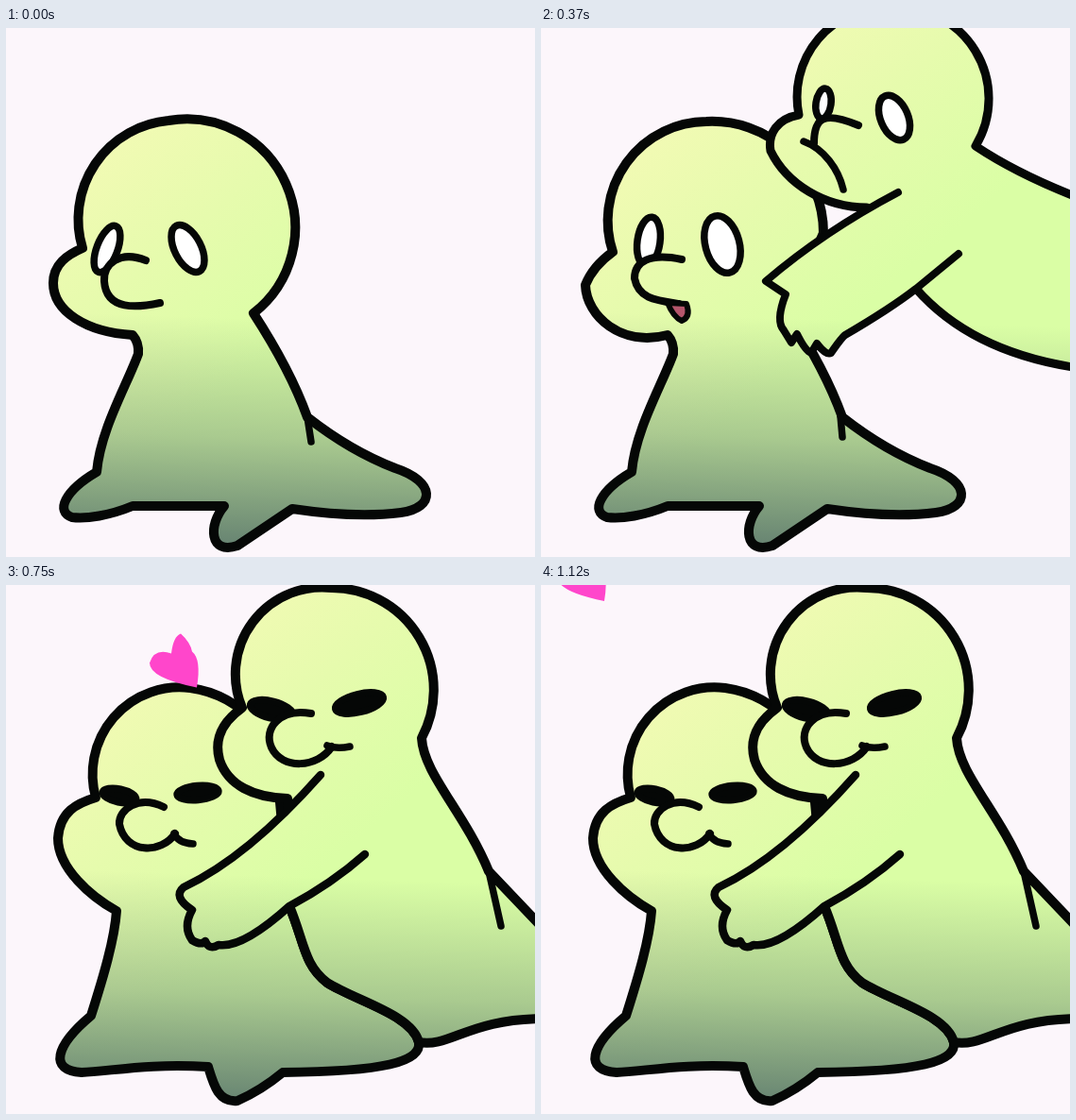
Animation, 560 px wide and 560 px high, one loop 1250 ms. Source, as an HTML page with a canvas:

```html
<!DOCTYPE html>
<html>
<head>
<meta charset="utf-8">
<title>Hug</title>
<style>
html, body { margin: 0; width: 100%; height: 100%; overflow: hidden; background: #fcf6fb; }
canvas { display: block; width: 560px; height: 560px; }
</style>
</head>
<body>
<canvas id="stage" width="560" height="560"></canvas>
<script>
const ctx = document.getElementById('stage').getContext('2d');
ctx.lineCap = ctx.lineJoin = 'round';
const INK = '#050706';

// Colours at even steps between two points
function gradient(x1, y1, x2, y2, ...colors) {
  const g = ctx.createLinearGradient(x1, y1, x2, y2);
  colors.forEach((c, i) => g.addColorStop(i / (colors.length - 1), c));
  return g;
}
const glow = gradient(100, 90, 300, 330, '#f4fab5', '#e6fbad', '#dafea5');
const dusk = gradient(280, 308, 272, 560, 'rgba(90,118,108,0)', 'rgba(90,118,108,.38)', 'rgba(90,118,108,.95)');

// Each maker returns a function that paints one part.
function part(path, width, ...fills) {
  return () => {
    for (const f of fills) { ctx.fillStyle = f; ctx.fill(path); }
    ctx.lineWidth = width;
    ctx.strokeStyle = INK;
    if (width) ctx.stroke(path);
  };
}
const skin = (d, width = 10) => part(new Path2D(d), width, glow, dusk);
const nose = d => skin(d, 8);
const line = d => part(new Path2D(d), 7.5);
function eye(x, y, rx, ry, deg, fill = '#fff') {
  const path = new Path2D();
  path.ellipse(x, y, rx, ry, deg * Math.PI / 180, 0, 7);
  return part(path, 7.5, fill);
}
const shut = (x, y, rx, ry, deg) => eye(x, y, rx, ry, deg, INK);
const arc = (r, sweep, end) => `A${r} ${r} 0 0 ${sweep} ${end}`;

// Head outlines: two arcs meeting at the crown
const buddyHead = (brow, r1, crown, r2, nape) => `M${brow}` + arc(r1, 1, crown) + arc(r2, 1, nape);
const huggerHead = (nape, r1, crown, r2, brow) => `M${nape}` + arc(r1, 0, crown) + arc(r2, 0, brow);

// Lower bodies, from the back round to the throat
const upright = `L262 302 Q301 362 319 412 Q365 448 412 466 C455 480 455 508 418 513 Q370 519 303 509
  L245 548 C215 558 214 526 231 506 H134 C110 516 85 520 70 518 C52 512 62 490 96 470
  C100 425 128 378 140 345 Q141 333 134 325`;
const back = 'L300 340 C316 378 315 402 340 421 C370 440 430 455 437 484';
const leaning = back + `C440 505 400 515 293 516 Q270 535 245 546 C225 548 220 530 214 510
  C150 506 110 515 80 516 C45 514 52 488 90 456 C103 415 115 375 117 345`;

const buddy = (head, base, muzzle) => skin(head + base + muzzle + 'Z');
const hugger = (head, muzzle, tail, side) =>
  skin(`${head}${muzzle}${back} C470 490 490 459 570 459 V365 L${tail} ${side}Z`);
const huggingArm = (upper, underside) => skin(
  `${upper} q-12 10 9 24 q-10 18 0 32 q10 6 14 1 q4 10 14 4 ${underside} 300 340 Q345 316 380 285`, 8.5);

const alone = [
  buddy(buddyHead('81 233', 105, '172 98', 115, '262 302'), upright, 'C85 322 50 300 50 270 C50 250 65 240 81 233'),
  line('M319 412 L323 438'),
  eye(107, 234, 11, 26, 21),
  eye(192.5, 233.5, 14, 27, -27),
  nose('M148 246 C120 235 103 250 104 268 C106 300 140 296 163 291')
];

const leaping = [
  skin('M302 53 Q240 56 203 64 Q185 52 186 72 L194 80 Q180 92 190 95 L280 128', 9),
  skin(huggerHead('492 46', 95, '395 -40', 90, '301 73') +
    'C280 82 277 102 280 120 C290 150 320 162 345 163 L447 181 Q510 196 570 240 V52 Q530 45 492 46Z', 9),
  skin(`M446 97 Q375 140 328 186 Q345 200 346 208 Q345 228 349 230 Q358 240 366 227 Q376 243 386 227
    Q402 238 412 216 Q425 190 447 181 Q480 165 516 147`, 8),
  eye(327, 70, 9, 17, -20),
  eye(390, 71, 13, 23, -20),
  nose('M360 80 C330 72 318 90 320 108 C326 135 360 137 380 110')
];

const landing = [
  buddy(buddyHead('76 237', 105, '175 99', 118, '299 217'), upright, 'C85 338 48 305 47 272 Q55 252 76 237'),
  line('M317 411 L319 433'),
  eye(114, 226, 12, 26, 8),
  eye(192, 229, 18, 31, -15),
  nose('M149 245 C115 238 99 247 99 265 C103 286 120 288 146 292'),
  part(new Path2D('M134 291 L154 292 Q159 306 149 310 Q140 306 134 291Z'), 6, '#b5566c'),
  skin(huggerHead('460 125', 97, '370 -22', 95, '273 92') +
    'C250 96 240 112 243 130 C260 165 300 190 345 190 L397 276 C440 325 500 350 570 360 V180 Q505 155 460 125Z', 9),
  skin(`M378 174 Q300 215 238 268 L259 282 Q248 310 257 320 L265 333 L271 324 Q280 342 286 344 L292 334
    Q302 347 307 344 Q318 328 322 325 Q370 297 397 276 L442 239`, 8),
  eye(299, 80, 8, 16, 8),
  eye(374, 95, 14.5, 25, -23),
  nose('M336 103 C300 88 289 94 289 122'),
  line('M278 120 C300 128 315 150 320 171')
];

const holding = [
  buddy(buddyHead('77 230', 102, '175 103', 118, '292 240'), leaning, 'C85 322 47 295 47 265 C48 240 60 232 77 230'),
  eye(117, 216, 11, 21, -20),
  eye(191.5, 216, 16, 29, -13),
  nose('M152 232 C125 226 110 240 110 255 C114 275 135 278 162 277'),
  hugger(huggerHead('452 143', 108, '340 -6', 84, '262 100'),
    'C235 108 217 120 217 142 C220 175 265 192 290 200', '522 325', 'C522 260 500 185 452 143'),
  line('M522 325 Q522 370 515 413'),
  huggingArm('M335 202 Q270 270 207 299', 'Q265 365'),
  eye(284, 108, 14, 18, -40),
  eye(373, 116, 22, 19, 15),
  nose('M322 114 C290 105 275 125 280 140 C285 165 315 168 332 155'),
  line('M331 149 L345 161')
];

const smugNose = nose('M323 136 C290 130 272 152 281 172 C292 196 330 194 345 171');
const happyNose = [
  nose('M167 235 C140 222 119 238 120 253 C126 285 165 285 179 263'),
  line('M178 263 Q182 273 198 274')
];

const settling = [
  buddy(buddyHead('85 232', 99, '185 108', 110, '292 240'), leaning, 'C108 325 54 310 54 270 C55 245 68 236 85 232'),
  eye(120.5, 221, 17, 19, 0),
  eye(198, 219, 20, 23, 0),
  ...happyNose,
  hugger(huggerHead('443 172', 113, '350 2', 88, '258 130'),
    'C230 148 225 165 232 185 C245 210 270 213 292 217', '520 320', 'C490 250 450 215 443 172'),
  line('M520 320 L525 350'),
  huggingArm('M350 195 Q275 265 203 300', 'Q260 372'),
  eye(284, 123, 18, 9, 32),
  eye(371, 119, 23, 11, -16),
  smugNose,
  line('M340 167 L351 172')
];

const cuddling = [
  buddy(buddyHead('95 225', 92, '195 109', 110, '290 230'), leaning, 'C90 330 55 300 55 268 C57 240 75 231 95 225'),
  shut(120, 223, 18, 7, 12),
  shut(203, 220, 22, 7.5, -5),
  ...happyNose,
  hugger(huggerHead('440 162', 108, '345 3', 92, '250 130'),
    'C222 150 222 170 226 185 C235 212 262 225 298 226', '511 303', 'C485 240 442 200 440 162'),
  line('M511 303 L524 361'),
  huggingArm('M333 201 Q256 288 188 320', 'Q250 385'),
  shut(281, 132, 23, 9, 14),
  shut(374, 125, 26, 9.5, -14),
  smugNose,
  line('M340 170 Q350 174 364 171')
];

const heart = part(new Path2D(`M157 78 Q107 68 107 52 Q112 36 130 42
  Q132 24 140 21 Q150 30 152 40 Q162 48 157 78Z`), 0, '#ff46cb');

const draw = parts => parts.forEach(paint => paint());
function shifted(x, y, parts) {
  ctx.save();
  ctx.translate(x, y);
  draw(parts);
  ctx.restore();
}
function floatHeart(step) {
  draw(cuddling);
  shifted(-45 * step, -30.5 * step, [heart]);
}

const scenes = [
  [0, () => draw(alone)],
  [120, () => { shifted(170, -30, leaping); draw(alone); }],
  [250, () => { draw(leaping); draw(alone); }],
  [370, () => draw(landing)],
  [500, () => draw(holding)],
  [620, () => draw(settling)],
  [750, () => floatHeart(-1)],
  [870, () => floatHeart(0)],
  [1000, () => floatHeart(1)],
  [1120, () => floatHeart(2)]
];

function tick() {
  const t = performance.now() % 1250;
  ctx.fillStyle = '#fcf6fb';
  ctx.fillRect(0, 0, 560, 560);
  scenes.filter(([start]) => start <= t).pop()[1]();
  requestAnimationFrame(tick);
}
tick();
</script>
</body>
</html>
```
